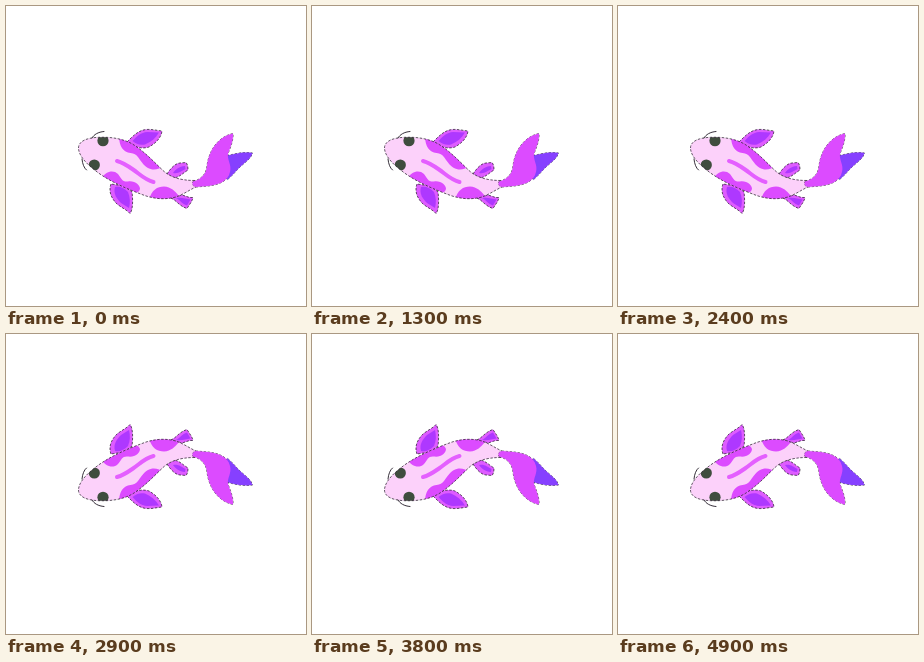
An HTML page with a canvas for the animation above (5000 ms loop, 300 px wide and 300 px high).

```html
<!DOCTYPE html>
<html lang="en">
<head>
<meta charset="utf-8">
<title>Koi</title>
<style>
html, body { margin: 0; width: 100%; height: 100%; overflow: hidden; background: #fff; }
canvas { display: block; width: 300px; height: 300px; }
</style>
</head>
<body>
<canvas id="stage" width="300" height="300"></canvas>
<script>
const ctx = document.getElementById('stage').getContext('2d');

const LOOP = 5000;
const HOLD = 500;
const MIRROR = 298;

const INK = '#201824';
const SKIN = '#fcd1fa';
const SPOT = '#dc4bff';
const STRIPE = '#e45fff';
const FIN = '#de5cff';
const FIN_CORE = '#ae38ff';
const TAIL_BACK = '#8640ff';
const EYE = '#3f4d3e';

const shape = d => new Path2D(d);

const body = shape(`M72.5 142 C72.5 135 81 132 91 131.4 C104 130.6 118 132.5 128 139
  C140 147 148 156 157 164.5 C164 171 174 174.5 189 174.5 L190 181
  C183 184 177 189 168 191.5 C157 194 146 192.5 136 188.5
  C124 184 112 179 101 172.5 C90 166 72.5 153 72.5 142 Z`);

const spots = [
  `M113 130 C113 140 117 146 124.5 147 C132 148 132 152 136 156.5
   C140.5 163 147 165 153 162.5 L158 160 L132 134 Z`,
  `M96 172 C99 166 107 163 112 168 C116 173 116 176 122 175.5
   C129 174.5 134 179 134 183 C133 187 129 188 124 187 L100 178 Z`,
  `M143 193 C146 184 151 180.5 158 180.5 C165 181 169 185 173 190 L168 196 Z`
].map(shape);

const stripe = shape('M111 155 C117 156.5 122 160 127 163.5 C133.5 168 139 174 147.5 176');

const fins = [
  [`M121 136 C127 130 132 124.5 140 123.5 C146 123 151 124.5 156 125
    C155 132 150 137 143 141 C137 143 128 142 121 136 Z`,
   'M126.5 135 C131 130 135 126.5 141 126 L153 126.5 C150 132 145 136 139 138.5 C134 139.5 130 138 126.5 135 Z'],
  [`M105 178 C102 186 106 193 111 198 C116 202 121 204 124 207.5
    C127 204 127 194 126 186 L119 180 Z`,
   'M109 181 C107 188 111 193 115 197 L123 202 C124.5 196 124 191 122 186 C118 182 114 180 109 181 Z'],
  [`M161 168 C165 162 169 157.5 174 157 L180 156.5 C182 159 182 162 182 164
    C177 167 174 171 168 172 Z`,
   'M167 167 C170 163 173 160.5 179 160 L179.5 163 C175 165 173 168 167 167 Z'],
  [`M165 192 C170 194 173 200 181 202.5 C183 199 186 196 187 191.5
    C183 192 180 190 176 189 Z`,
   'M170 192 C174 194 176 198 181 199.5 L184.5 193.5 C180 193 176 191 170 192 Z']
].map(pair => pair.map(shape));

const tailBack = shape(`M221 150 C227 148 237 145.5 246.5 147
  C245 153 239 156 233 162 C229 166 226 170 221 174 Z`);

const tail = shape(`M187 175.5 C196 173 200 168 201 160 C202.5 146 211 131 227 127.5
  C227.5 135 224 142 222 148 C221 154 226 159 224 166 C222 176 211 179 202 180
  L190 181 C186 180 186 177 187 175.5 Z`);

const whiskers = shape('M86 132 C88 128.5 92 126 98 125.5 M76 153 C76.5 158 78 162 80.5 164');

function fill(path, color) {
  ctx.fillStyle = color;
  ctx.fill(path);
}

function line(path, color, width) {
  ctx.strokeStyle = color;
  ctx.lineWidth = width;
  ctx.stroke(path);
}

// Fine broken ink line
function outline(path) {
  ctx.save();
  ctx.lineCap = 'butt';
  ctx.setLineDash([2.5, 1.5]);
  line(path, INK, 0.7);
  ctx.restore();
}

function eye(x, y) {
  ctx.fillStyle = EYE;
  ctx.beginPath();
  ctx.arc(x, y, 5.6, 0, Math.PI * 2);
  ctx.fill();
}

function drawFish() {
  for (const [outer, core] of fins) {
    fill(outer, FIN);
    fill(core, FIN_CORE);
    outline(outer);
  }

  fill(body, SKIN);
  ctx.save();
  ctx.clip(body);
  spots.forEach(spot => fill(spot, SPOT));
  line(stripe, STRIPE, 4);
  eye(97, 134.7);
  eye(88.3, 159);
  ctx.restore();
  outline(body);

  // Outlines go under the fills so the two tail lobes meet without a seam
  outline(tail);
  outline(tailBack);
  fill(tailBack, TAIL_BACK);
  fill(tail, SPOT);
  line(whiskers, INK, 0.9);
}

function render(now) {
  const flipped = Math.floor((now % LOOP) / HOLD) % 2 === 1;
  ctx.setTransform(1, 0, 0, 1, 0, 0);
  ctx.fillStyle = '#fff';
  ctx.fillRect(0, 0, 300, 300);
  if (flipped) ctx.setTransform(1, 0, 0, -1, 0, MIRROR);
  ctx.lineCap = 'round';
  ctx.lineJoin = 'round';
  drawFish();
}

const start = performance.now();
function tick() {
  render(performance.now() - start);
  requestAnimationFrame(tick);
}
tick();
</script>
</body>
</html>
```
